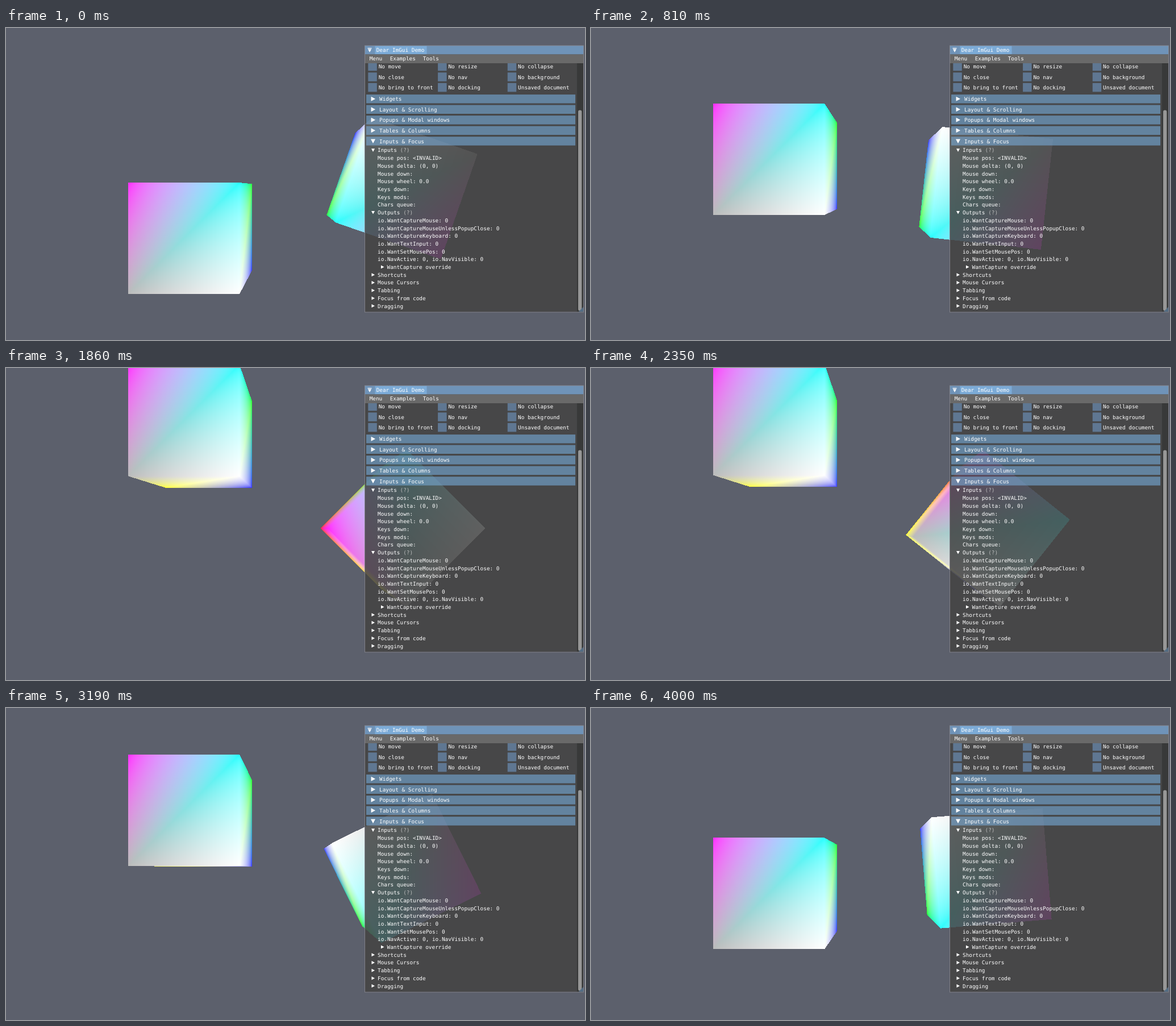
Animation, 1019 px wide and 549 px high, one loop 4.07 s. Source, as an HTML page with a canvas:

```html
<!DOCTYPE html>
<html lang="en">
<head>
<meta charset="utf-8">
<title>Spinning cubes</title>
<style>
  html, body { margin: 0; width: 100%; height: 100%; overflow: hidden; background: rgb(92,96,108); }
  canvas, svg { position: absolute; left: 0; top: 0; width: 1019px; height: 549px; }
  text { font: 9.39px "DejaVu Sans Mono", monospace; fill: #fff; white-space: pre; text-rendering: geometricPrecision; }
  .dim { fill: #bcbcbc; }
</style>
</head>
<body>
<canvas id="scene" width="1019" height="549"></canvas>
<svg id="ui" viewBox="0 0 1019 549"></svg>
<script>
const W = 1019, H = 549;
const ctx = document.getElementById('scene').getContext('2d');
const ui = document.getElementById('ui');

// Colours are mixed in linear light and encoded to sRGB at the end.
const toLinear = v => (v /= 255) <= 0.04045 ? v / 12.92 : ((v + 0.055) / 1.055) ** 2.4;
const STEPS = 4095;
const encode = Uint8Array.from({ length: STEPS + 1 }, (_, i) => {
  const v = i / STEPS;
  return Math.round(255 * (v <= 0.0031308 ? 12.92 * v : 1.055 * v ** (1 / 2.4) - 0.055));
});
const BACKDROP = [92, 96, 108].map(toLinear);

/* ---------- translucent window layers ---------- */
const keep = new Float32Array(W * H).fill(1);
const tint = new Float32Array(W * H * 3);
const overlap = (i, from, to) => Math.min(i + 1, to) - Math.max(i, from);

function layer(x0, y0, x1, y1, color, alpha) {
  for (let y = Math.floor(y0); y < y1; y++) {
    for (let x = Math.floor(x0); x < x1; x++) {
      const p = y * W + x, a = alpha * overlap(x, x0, x1) * overlap(y, y0, y1);
      keep[p] *= 1 - a;
      for (let c = 0; c < 3; c++) tint[p * 3 + c] = tint[p * 3 + c] * (1 - a) + color[c] * a;
    }
  }
}

/* ---------- window contents ---------- */
function add(name, attrs, text) {
  const el = document.createElementNS('http://www.w3.org/2000/svg', name);
  for (const key in attrs) el.setAttribute(key, attrs[key]);
  if (text) el.textContent = text;
  return ui.appendChild(el);
}
const label = (x, y, text, cls = '') => add('text', { x, y: y + 3.3, class: cls }, text);
const box = (x, y, x1, y1, fill, rx = 0) => add('rect', { x, y, width: x1 - x, height: y1 - y, fill, rx });
const shape = (points, fill) => add('polygon', { points: points.join(' '), fill });
function arrow(x, y, size, open) {
  const a = size, b = size * 0.86;
  shape(open
    ? [x - a, y - b, x + a, y - b, x, y + a]
    : [x - b, y - a, x + a, y, x - b, y + a], '#fff');
}

function buildWindow() {
  layer(631, 31, 1017, 500, [0.06, 0.06, 0.06], 0.94);
  layer(1004.8, 62, 1016, 499, [0.02, 0.02, 0.02], 0.53);

  box(631, 31, 1016.5, 46.5, 'rgb(111,147,184)');
  box(649.5, 31.6, 740.5, 46, 'rgb(124,171,215)');
  box(631, 46.5, 1016.5, 62, 'rgb(105,105,105)');
  box(1007, 144.5, 1013.3, 497.5, 'rgb(151,151,151)', 3.1);
  shape([1016, 491, 1016, 499.5, 1007.5, 499.5], 'rgb(82,108,132)');
  add('rect', { x: 631.5, y: 31, width: 385, height: 469, fill: 'none', stroke: 'rgb(134,134,143)', 'stroke-width': 0.9 });

  box(636.5, 35, 643.5, 36.3, '#fff');
  arrow(640, 39.8, 3, true);
  label(651.7, 38.8, 'Dear ImGui Demo');
  label(639.7, 54, 'Menu');
  label(675.7, 54, 'Examples');
  label(733.7, 54, 'Tools');

  [['No move', 'No resize', 'No collapse'],
   ['No close', 'No nav', 'No background'],
   ['No bring to front', 'No docking', 'Unsaved document']].forEach((row, j) => row.forEach((name, i) => {
    const x = 637.4 + i * 122.7, y = 59.9 + j * 18.5;
    layer(x, Math.max(y, 62), x + 15.3, y + 15.3, [0.16, 0.29, 0.48], 0.54);
    label(x + 18.3, y + 7.8, name);
  }));

  ['Widgets', 'Layout & Scrolling', 'Popups & Modal windows', 'Tables & Columns', 'Inputs & Focus'].forEach((name, i) => {
    const y = 117.1 + i * 18.55;
    layer(634, y, 1002, y + 15.3, [0.26, 0.59, 0.98], 0.31);
    arrow(646, y + 7.6, 4, i === 4);
    label(657, y + 7.9, name);
  });

  // The first character marks a tree node: v open, > closed.
  const rows = [
    'vInputs (?)', ' Mouse pos: <INVALID>', ' Mouse delta: (0, 0)', ' Mouse down:', ' Mouse wheel: 0.0',
    ' Keys down:', ' Keys mods:', ' Chars queue:', 'vOutputs (?)', ' io.WantCaptureMouse: 0',
    ' io.WantCaptureMouseUnlessPopupClose: 0', ' io.WantCaptureKeyboard: 0', ' io.WantTextInput: 0',
    ' io.WantSetMousePos: 0', ' io.NavActive: 0, io.NavVisible: 0', '>WantCapture override',
    '>Shortcuts', '>Mouse Cursors', '>Tabbing', '>Focus from code', '>Dragging'];
  rows.forEach((row, i) => {
    const y = 215.1 + i * 13.71, indent = i === 15 ? 16.5 : 0;
    const [name, hint] = row.slice(1).split(' (?)');
    if (row[0] !== ' ') arrow(646 + indent, y - 0.2, 3, row[0] === 'v');
    label(654 + indent, y, name);
    if (hint === '') label(654 + (name.length + 1) * 5.653, y, '(?)', 'dim');
  });
}

/* ---------- cubes ---------- */
const EYE = { x: 509, y: 282 }, HALF = 98, BACK = 0.777;
const LOW = 0.02;
const COLORS = [
  [1, LOW, 1], [LOW, 1, 1], [1, 1, 1], [0.5, 0.5, 0.5],
  [1, LOW, LOW], [LOW, 1, LOW], [LOW, LOW, 1], [1, 1, LOW]];
// Clockwise seen from outside; each quad is split from its first to its third corner.
const FACES = [[1, 2, 3, 0], [2, 1, 5, 6], [2, 6, 7, 3], [0, 3, 7, 4], [4, 5, 1, 0]]
  .map(face => face);

const scene = new Float32Array(W * H * 3);
const image = ctx.createImageData(W, H);
image.data.fill(255);

const cross = (a, b, x, y) => (b.x - a.x) * (y - a.y) - (b.y - a.y) * (x - a.x);

function triangle(a, b, c) {
  const area = cross(a, b, c.x, c.y);
  if (area === 0) return;
  const x0 = Math.max(0, Math.floor(Math.min(a.x, b.x, c.x))), x1 = Math.min(W - 1, Math.ceil(Math.max(a.x, b.x, c.x)));
  const y0 = Math.max(0, Math.floor(Math.min(a.y, b.y, c.y))), y1 = Math.min(H - 1, Math.ceil(Math.max(a.y, b.y, c.y)));
  for (let y = y0; y <= y1; y++) {
    for (let x = x0; x <= x1; x++) {
      let u = cross(b, c, x + 0.5, y + 0.5) / area;
      let v = cross(c, a, x + 0.5, y + 0.5) / area;
      let w = 1 - u - v;
      if (u < 0 || v < 0 || w < -1e-9) continue;
      u *= a.depth; v *= b.depth; w *= c.depth;
      const sum = u + v + w, p = (y * W + x) * 3;
      for (let k = 0; k < 3; k++) scene[p + k] = (u * a.color[k] + v * b.color[k] + w * c.color[k]) / sum;
    }
  }
}

function cube(cx, cy, angle) {
  const cos = Math.cos(angle) * HALF, sin = Math.sin(angle) * HALF;
  const points = COLORS.map((color, i) => {
    const sx = i % 4 === 1 || i % 4 === 2 ? 1 : -1, sy = i % 4 > 1 ? 1 : -1;
    const depth = i < 4 ? 1 : BACK;
    return {
      x: EYE.x + (cx + sx * cos - sy * sin) * depth,
      y: EYE.y + (cy + sx * sin + sy * cos) * depth,
      depth, color
    };
  });
  for (const face of FACES) {
    const [a, b, c, d] = face.map(i => points[i]);
    const facing = (c.x - a.x) * (d.y - b.y) - (c.y - a.y) * (d.x - b.x);
    if (facing <= 0) continue;
    triangle(a, b, c);
    triangle(a, c, d);
  }
}

function draw(time) {
  for (let p = 0; p < scene.length; p += 3) {
    scene[p] = BACKDROP[0]; scene[p + 1] = BACKDROP[1]; scene[p + 2] = BACKDROP[2];
  }
  const phase = (-26.7 + 0.05495 * time) * Math.PI / 180;
  cube(-2 * HALF, -2 * HALF * Math.sin(phase), 0);
  cube(2 * HALF, 0, -Math.PI * Math.cos(phase));

  const out = image.data;
  for (let p = 0, s = 0, o = 0; p < W * H; p++, s += 3, o += 4) {
    const k = keep[p];
    for (let c = 0; c < 3; c++) out[o + c] = encode[(scene[s + c] * k + tint[s + c]) * STEPS + 0.5 | 0];
  }
  ctx.putImageData(image, 0, 0);
}

/* ---------- timing ---------- */
const LOOP = 4070, COUNT = 59, SHORT = [3, 11, 13, 50, 51, 54];
const starts = [0];
for (let i = 1; i < COUNT; i++) starts.push(starts[i - 1] + (SHORT.includes(i - 1) ? 60 : 70));

let shown = -1;
const origin = performance.now();
function tick() {
  const t = Math.max(0, performance.now() - origin) % LOOP;
  let step = COUNT - 1;
  while (starts[step] > t) step--;
  if (step !== shown) draw(starts[shown = step]);
  requestAnimationFrame(tick);
}

buildWindow();
tick();
</script>
</body>
</html>
```
